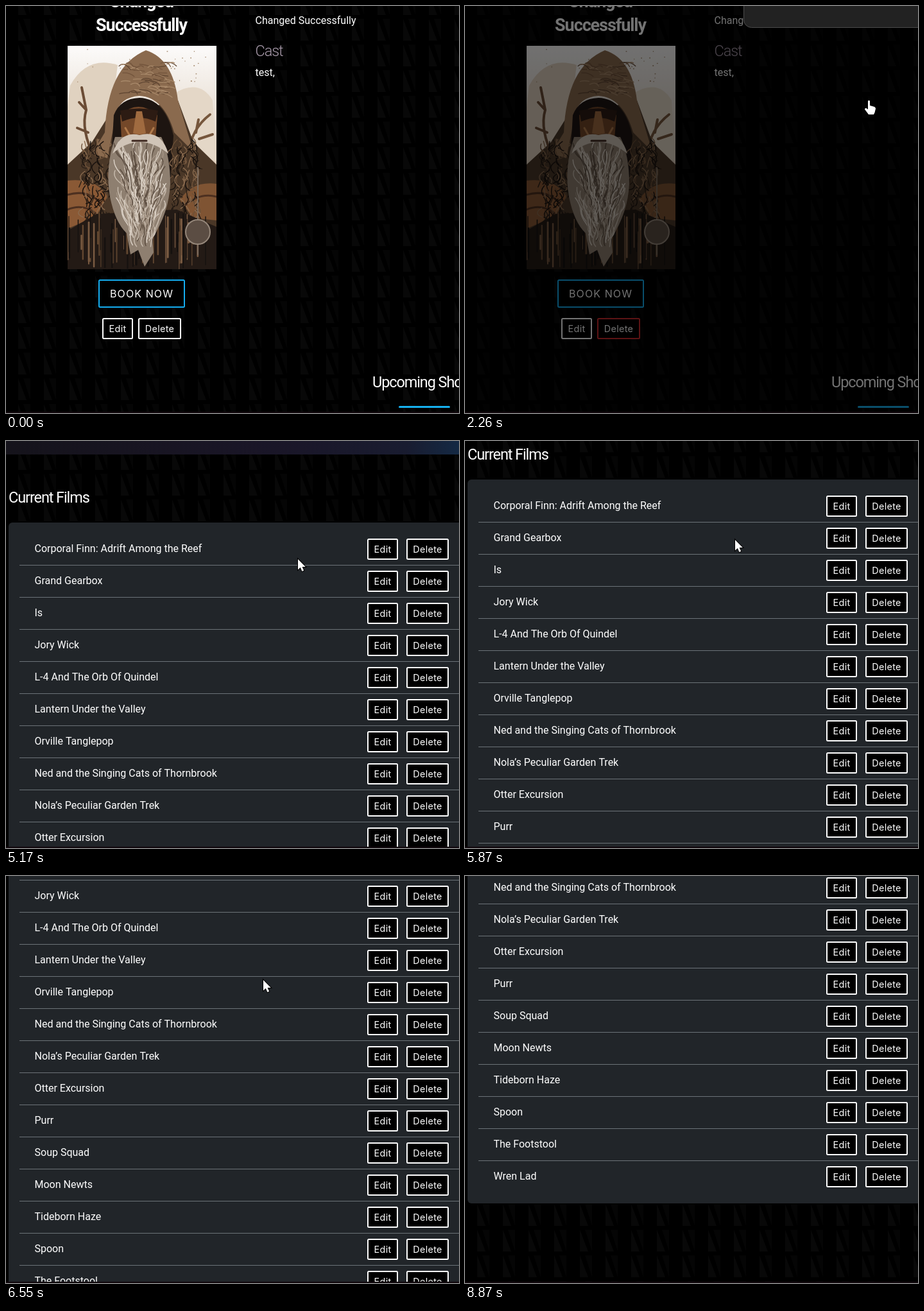
Write an HTML page with a canvas that moves like this. It is 706 by 634 pixels and loops after 9.54 s.

```html
<!DOCTYPE html>
<html lang="en">
<head>
<meta charset="utf-8">
<title>Film admin</title>
<style>
  html, body { margin: 0; width: 100%; height: 100%; overflow: hidden; background: #000; }
  canvas { display: block; }
</style>
</head>
<body>
<canvas id="stage" width="706" height="634"></canvas>
<script>
const W = 706, H = 634, LOOP = 9540;
const ctx = document.getElementById('stage').getContext('2d');

const films = [
  'Corporal Finn: Adrift Among the Reef', 'Grand Gearbox', 'Is', 'Jory Wick',
  'L-4 And The Orb Of Quindel', 'Lantern Under the Valley', 'Orville Tanglepop',
  'Ned and the Singing Cats of Thornbrook', 'Nola’s Peculiar Garden Trek',
  'Otter Excursion', 'Purr', 'Soup Squad', 'Moon Newts', 'Tideborn Haze',
  'Spoon', 'The Footstool', 'Wren Lad'
];

// Pointer path: time, x, y
const pointer = [
  [0, 560, 640], [690, 560, 640], [800, 500, 606], [1000, 355, 545], [1180, 268, 512],
  [1310, 243, 500], [1850, 243, 500], [2000, 350, 410], [2260, 629, 147],
  [2420, 685, 75], [2610, 709, 27], [2635, 720, 20], [4169, 720, 20],
  [4170, 519, 286], [4540, 519, 286], [4700, 430, 252], [4860, 351, 214],
  [5020, 405, 192], [5170, 455, 184], [5290, 455, 184], [5370, 430, 151],
  [5700, 430, 151], [6010, 413, 157], [6310, 413, 157], [6550, 401, 162],
  [7030, 393, 170], [7330, 393, 170], [7520, 560, 128], [7660, 697, 260],
  [7850, 694, 640], [8848, 582, 640], [8850, 582, 632], [8868, 582, 632],
  [8869, 582, 640], [LOOP, 560, 640]
];
// Wheel scrolls: start, end, distance
const scrolls = [[5700, 6010, 100], [6310, 6590, 200], [6790, 7110, 200]];

const arrow = new Path2D('M0 0v16.5l3.8-3.6 2.6 6 2.8-1.2-2.6-5.8h5.2z');
const hand = new Path2D('M-1 1q1.5-2 3 0v7l7 2q2 1 2 3l-1.5 6-1.5 3h-8l-6-8q0-2 2-2l3 2z');

const ramp = (t, a, b) => Math.min(1, Math.max(0, (t - a) / (b - a)));
const easeOut = p => 1 - (1 - p) ** 1.4;

function text(str, x, y, { size = 16, weight = 400, family = 'Roboto', color = '#fff',
                           align = 'left', spacing = 0 } = {}) {
  ctx.font = `${weight} ${size}px ${family}, sans-serif`;
  ctx.letterSpacing = spacing + 'px';
  ctx.textAlign = align;
  ctx.fillStyle = color;
  ctx.fillText(str, x, y);
}

const heading = (str, x, y, style) => text(str, x, y, { size: 23.5, spacing: -1.1, ...style });

function box(x, y, w, h, r, fill, stroke, line = 2) {
  ctx.beginPath();
  ctx.roundRect(x + line / 2, y + line / 2, w - line, h - line, r);
  ctx.fillStyle = fill;
  ctx.fill();
  if (!stroke) return;
  ctx.strokeStyle = stroke;
  ctx.lineWidth = line;
  ctx.stroke();
}

function button(label, x, y, w, h, border = '#fff', size = 14.4, spacing = 0.3) {
  box(x, y, w, h, 1.5, '#000', border);
  text(label, x + w / 2, y + h / 2 + size * 0.36, { size, spacing, family: 'Inter', align: 'center' });
}

function makeCanvas(w, h, paint) {
  const canvas = document.createElement('canvas');
  canvas.width = w;
  canvas.height = h;
  paint(canvas.getContext('2d'));
  return canvas;
}

const tile = makeCanvas(40, 40, c => {
  const triangle = (d, fill) => { c.fillStyle = fill; c.fill(new Path2D(d)); };
  triangle('M19 3v34h13z', '#080808');
  triangle('M27 3h11v34z', '#050505');
});
const pattern = ctx.createPattern(tile, 'repeat');

function backdrop(shift) {
  ctx.fillStyle = '#000';
  ctx.fillRect(0, 0, W, H);
  pattern.setTransform(new DOMMatrix().translate(0, shift));
  ctx.fillStyle = pattern;
  ctx.fillRect(0, 0, W, H);
}

const poster = makeCanvas(232, 348, c => {
  let seed = 7;
  const rand = (a, b) => a + (b - a) * ((seed = seed * 16807 % 2147483647) / 2147483647);
  const pick = list => list[Math.floor(rand(0, list.length))];
  const shape = (d, fill) => { c.fillStyle = fill; c.fill(new Path2D(d)); };
  const line = (d, color, width) => {
    c.strokeStyle = color;
    c.lineWidth = width;
    c.stroke(new Path2D(d));
  };
  c.lineCap = 'round';

  const sky = c.createLinearGradient(0, 0, 0, 220);
  sky.addColorStop(0, '#fcfbfa');
  sky.addColorStop(1, '#d6c3ae');
  c.fillStyle = sky;
  c.fillRect(0, 0, 232, 348);
  shape('M4 62Q30 15 78 30L60 170 0 185V95z', '#e0d2c0');
  shape('M165 75Q205 50 226 85L232 180 180 160z', '#e4d7c7');
  for (let i = 0; i < 30; i++) {
    c.fillStyle = '#a58b70';
    c.fillRect(rand(15, 215), rand(5, 60), rand(1, 2), rand(1, 2));
  }
  line('M42 175Q20 130 29 100L22 65M29 100L18 88M32 135L15 128', '#6b4c35', 4);
  line('M188 170Q192 130 222 107M200 135L204 115M205 145L226 138', '#76563c', 4);

  // Cloak, shoulders and hood
  shape('M0 185L38 150 62 112 172 85 196 150 232 185V348H0z', '#4a3727');
  shape('M0 210Q45 205 62 235L45 265 0 285z', '#8a5935');
  shape('M232 215Q195 210 175 240L195 268 232 272z', '#7f5433');
  line('M0 232Q35 222 55 250M0 255Q25 245 45 262M232 235Q205 228 182 250', '#4d3020', 3);
  shape('M58 135Q62 32 122 7Q164 20 172 85L196 165 166 135Q150 80 112 78Q82 80 76 105L62 175 38 168z', '#8a6a4e');
  for (let i = 0; i < 55; i++) {
    const x = rand(80, 155), y = rand(25, 75);
    line(`M${x} ${y}q${rand(4, 12)} ${rand(-8, 2)} ${rand(12, 20)} ${rand(-2, 6)}`,
      pick(['#5d4431', '#a98a6b', '#72543c']), 1.3);
  }
  shape('M72 108Q82 82 112 81Q152 82 165 140L160 215H66z', '#1d1511');

  // Shadowed face
  shape('M82 108Q110 82 140 108L137 145Q112 165 84 145z', '#744829');
  shape('M82 101Q112 94 141 101L137 118Q112 106 85 118z', '#2c1b13');
  shape('M107 102h9l6 34q-10 4-20 0z', '#a06b40');
  line('M90 128l8 14M134 128l-8 14', '#b07a4b', 3);

  for (let i = 0; i < 200; i++) {
    const x = i % 2 ? rand(162, 205) : rand(22, 66), y = rand(145, 270);
    line(`M${x} ${y}q${rand(-14, 14)} 8 ${rand(-8, 8)} ${rand(8, 20)}`,
      pick(['#8b6c50', '#2c2118', '#6c5038', '#19120e']), 1.4);
  }

  // Robe with drips
  shape('M0 288L45 262 170 255 232 282V348H0z', '#231a15');
  for (let i = 0; i < 60; i++) {
    const x = rand(0, 232);
    line(`M${x} ${rand(258, 300)}V${rand(305, 348)}`, pick(['#624730', '#15110f', '#7a5b42']), rand(1, 3));
  }

  // Beard
  shape('M74 142Q58 190 66 235Q74 275 92 292L98 325 110 318 120 344 134 322 132 300Q158 260 160 215Q160 170 146 142z', '#8e7f70');
  for (let i = 0; i < 150; i++) {
    const x = rand(72, 154), y = rand(148, 255), drift = (114 - x) * 0.22, wave = rand(-9, 9);
    line(`M${x} ${y}q${wave} 10 ${drift} 20t${drift} 20t${drift / 2} 18`,
      pick(['#c9bdaf', '#5c4d40', '#ddd3c8', '#a59585']), 1.4);
  }
  shape('M70 168Q82 132 112 139Q146 130 157 168Q135 150 113 150Q90 150 70 168z', '#d0c4b7');
  line('M101 148h22', '#3e2820', 3);

  // Medallion
  line('M203 190V270M203 305V325', '#7c6c5e', 2);
  c.beginPath();
  c.arc(203, 290, 19, 0, 7);
  c.fillStyle = '#5b4d43';
  c.fill();
  c.strokeStyle = '#95877a';
  c.lineWidth = 2;
  c.stroke();
});

function detailPage(t) {
  backdrop(17);
  const title = { size: 27, weight: 700, align: 'center' };
  heading('Changed', 211, 2, title);
  heading('Successfully', 211, 39, title);
  ctx.drawImage(poster, 96, 62);
  button('BOOK NOW', 144, 426, 135, 44, '#14adf0', 16, 1.1);
  button('Edit', 150, 486, 48, 33);
  const hover = ramp(t, 1190, 1310);
  button('Delete', 206, 486, 67, 33, `rgb(${255 - 50 * hover},${255 - 212 * hover},${255 - 210 * hover})`);
  text('Changed Successfully', 388.5, 28);
  heading('Cast', 388.5, 78, { color: '#a99bab', weight: 300 });
  text('test,', 388.5, 109);
  heading('Upcoming Shows', 571, 594);
  box(612, 623, 80, 3, 1.5, '#16b0ee', null, 0);

  const shade = ramp(t, 1660, 1810) - ramp(t, 3680, 3930);
  ctx.fillStyle = `rgba(0,0,0,${0.55 * shade})`;
  ctx.fillRect(0, 0, W, H);

  const opened = easeOut(ramp(t, 1810, 2110)) - easeOut(ramp(t, 3380, 3680));
  ctx.globalAlpha = ramp(t, 1810, 1960) - ramp(t, 3380, 3530);
  box(434, -200 - 50 * (1 - opened), 500, 234, 12, '#222', '#4c4c4c', 1);
  ctx.globalAlpha = 1;
}

function listPage(t, mx, my) {
  const scroll = scrolls.reduce((sum, [a, b, d]) => sum + d * easeOut(ramp(t, a, b)), 0);
  backdrop(8 - scroll);
  ctx.save();
  ctx.translate(0, -Math.round(scroll));
  const banner = ctx.createLinearGradient(0, 0, W, 60);
  banner.addColorStop(0, '#15131b');
  banner.addColorStop(0.6, '#1a1628');
  banner.addColorStop(0.88, '#191c30');
  banner.addColorStop(1, '#142a45');
  ctx.fillStyle = banner;
  ctx.fillRect(0, 0, W, 21);
  heading('Current Films', 4, 96);
  box(4, 127, 760, 883, 6, '#212529', null, 0);
  films.forEach((film, i) => {
    const y = 152 + 50 * i, top = y - scroll;
    const over = mx >= 624 && mx < 690 && my >= top && my < top + 33;
    text(film, 44.5, y + 21);
    button('Edit', 563, y, 48, 33);
    button('Delete', 624, y, 66, 33, over ? '#cd2b2d' : '#fff');
    ctx.fillStyle = '#6c7378';
    if (i < films.length - 1) ctx.fillRect(21, y + 41, W, 1);
  });
  ctx.restore();
}

function pointerAt(t) {
  const i = pointer.findIndex(key => key[0] > t);
  const [t0, x0, y0] = pointer[i - 1], [t1, x1, y1] = pointer[i];
  const p = ramp(t, t0, t1);
  return [x0 + (x1 - x0) * p, y0 + (y1 - y0) * p];
}

function drawPointer(shape, x, y) {
  ctx.save();
  ctx.translate(Math.round(x), Math.round(y));
  ctx.strokeStyle = '#000';
  ctx.lineWidth = 2;
  ctx.stroke(shape);
  ctx.fillStyle = '#fff';
  ctx.fill(shape);
  ctx.restore();
}

function frame(now) {
  const t = now % LOOP, [x, y] = pointerAt(t);
  if (t < 4170) detailPage(t);
  else listPage(t, x, y);
  ctx.fillStyle = '#10070c';
  ctx.fillRect(0, 632, W, 2);
  drawPointer(t > 1190 && t < 4170 ? hand : arrow, x, y);
  requestAnimationFrame(frame);
}
requestAnimationFrame(frame);
</script>
</body>
</html>
```
